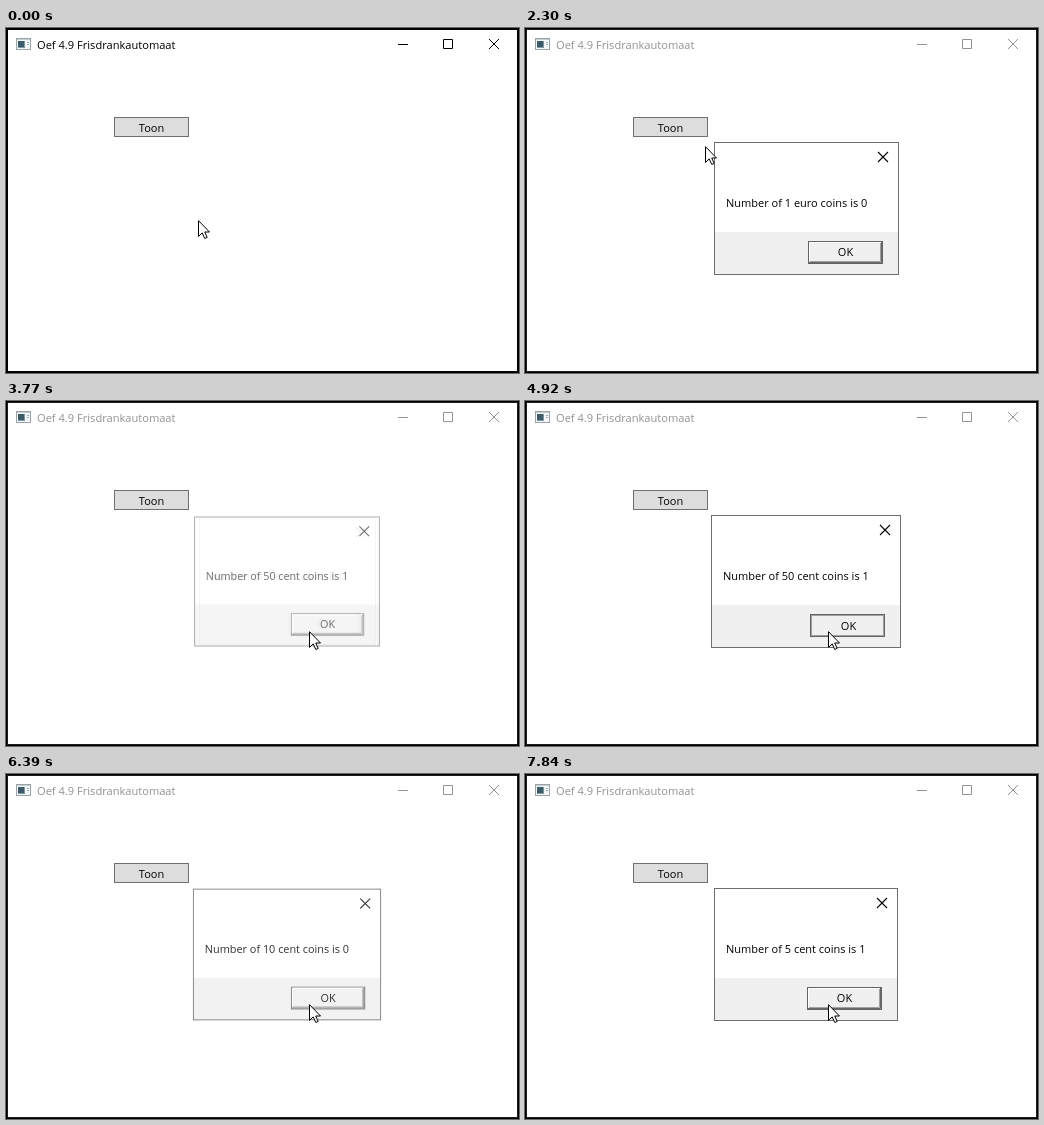
These frames come from a looping animation (513x345 px, 8000 ms). An HTML page:

```html
<!DOCTYPE html>
<html lang="nl">
<head>
<meta charset="utf-8">
<title>Frisdrankautomaat</title>
<style>
  html, body { margin: 0; width: 100%; height: 100%; overflow: hidden; background: #fff; }
  svg { display: block; width: 513px; height: 345px; }
  text { font: 11px "Open Sans", "Noto Sans", sans-serif; }
  .mid { text-anchor: middle; }
</style>
</head>
<body>
<svg id="stage" viewBox="0 0 513 345" fill="none">
  <rect width="513" height="345" fill="#fff"/>
  <rect id="edge" x="1.5" y="1.5" width="510" height="342" stroke="#000"/>
  <rect x=".5" y=".5" width="512" height="344" stroke="#000"/>
  <g id="icon">
    <rect x="10.5" y="10.5" width="14" height="11" fill="#f4f6f7" stroke="#9aa3a8"/>
    <path d="M11 11.5H24" stroke="#c5ced3"/>
    <rect x="12" y="13" width="7" height="7" fill="#3d5a68"/>
    <path d="M12 19.5H19M18.5 13V20" stroke="#7b98a3"/>
    <path d="M21 14.5H23M21 16.5H23" stroke="#8fb0b8"/>
  </g>
  <text id="title" x="31" y="21" style="font-size:11.1px">Oef 4.9 Frisdrankautomaat</text>
  <path id="controls" d="M392 16.5H402M437.5 11.5H446.5V20.5H437.5ZM483 11L493 21M493 11L483 21"/>
  <rect id="toon" x="108.5" y="89.5" width="74" height="19"/>
  <text class="mid" x="145.5" y="104" fill="#000">Toon</text>
  <g id="dialogs"></g>
  <path id="cursor" d="M.5 .7V16.4L4.2 12.9 6.8 18.5 9.2 17.4 6.7 12H11.5Z" fill="#fff" stroke="#000"/>
</svg>
<script>
const LOOP = 8000;
const $ = id => document.getElementById(id);

// Bursts of screen updates: first, last, number of steps
const bursts = [
  [820, 1360, 8], [1590, 2010, 6], [2210, 2970, 11], [3050, 3380, 5],
  [3690, 3930, 4], [4920, 5320, 6], [6080, 6550, 7], [7590, 7840, 4]
];
// Pointer moves: burst index, from, to
const moves = [
  [0, [192, 192], [169, 102]],
  [2, [169, 102], [254, 218]],
  [3, [254, 218], [303, 230]]
];
// Dialogs: message, left, right, opening time, time OK goes down
const boxes = [
  ['1 euro coins is 0', 189, 374, 1758, 3540],
  ['50 cent coins is 1', 186, 376, 3690, 4920],
  ['20 cent coins is 0', 186, 376, 5080, 6080],
  ['10 cent coins is 0', 186, 376, 6260, 7430],
  ['5 cent coins is 1', 189, 373, 7590, Infinity]
];
const TOP = 114, HEIGHT = 133;

const clamp = v => Math.min(1, Math.max(0, v));
const set = (el, attrs) => { for (const k in attrs) el.setAttribute(k, attrs[k]); };

function buildDialog([message, left, right]) {
  const g = document.createElementNS('http://www.w3.org/2000/svg', 'g');
  const b = right - 91, y = 213, w = 75, h = 23, cx = right - 16;
  g.innerHTML = `
    <rect x="${left}" y="${TOP}" width="${right - left}" height="${HEIGHT}" fill="#fff"/>
    <rect x="${left}" y="204" width="${right - left}" height="43" fill="#f0f0f0"/>
    <rect x="${left + .5}" y="${TOP + .5}" width="${right - left - 1}" height="${HEIGHT - 1}" stroke="#6e6e6e"/>
    <path d="M${cx - 5} 124L${cx + 5} 134M${cx + 5} 124L${cx - 5} 134" stroke="#000" stroke-width="1.1"/>
    <text x="${left + 12}" y="179" fill="#000">Number of ${message}</text>
    <rect x="${b + .5}" y="${y + .5}" width="${w - 1}" height="${h - 1}" fill="#f0f0f0" stroke="#646464"/>
    <g class="up">
      <path d="M${b + 1.5} ${y + h - 2}V${y + 1.5}H${b + w - 2}" stroke="#fff"/>
      <path d="M${b + 1} ${y + h - 1.5}H${b + w - 1.5}V${y + 1}" stroke="#696969"/>
      <path d="M${b + 2} ${y + h - 2.5}H${b + w - 2.5}V${y + 2}" stroke="#a0a0a0"/>
    </g>
    <rect class="down" x="${b + 1.5}" y="${y + 1.5}" width="${w - 3}" height="${h - 3}" stroke="#a0a0a0"/>
    <text class="mid ok" x="${b + w / 2}" y="228" fill="#000">OK</text>`;
  $('dialogs').append(g);
  return g;
}
const dialogs = boxes.map(buildDialog);

function snap(t) {
  for (const [a, b, n] of bursts) {
    if (t < a) return t;
    if (t < b) return a + Math.floor((t - a) / (b - a) * (n - 1) + .1) * (b - a) / (n - 1);
  }
  return t;
}

function pointer(t) {
  let pos = moves[0][1];
  for (const [i, from, to] of moves) {
    const [a, b, n] = bursts[i], step = (b - a) / (n - 1);
    if (t < a) break;
    const p = clamp((t - a + step) / (b - a + step));
    const e = (p + p * p * (3 - 2 * p)) / 2;
    pos = from.map((v, j) => Math.round(v + (to[j] - v) * e));
  }
  return pos;
}

function drawDialog(i, t) {
  const [, left, right, open, press] = boxes[i];
  const close = i + 1 < boxes.length ? boxes[i + 1][3] : Infinity;
  const rest = 1 - clamp((t - open) / 240);
  let alpha = t < open ? 0 : 1 - rest * rest;
  let scale = .95 + .05 * alpha;
  if (t >= close) {
    const v = clamp((t - close + 20) / 115);
    alpha = 1 - v;
    scale = 1 - .05 * v;
  }
  const g = dialogs[i], cx = (left + right) / 2, cy = TOP + HEIGHT / 2;
  const down = t >= press && t < close;
  set(g, {
    opacity: alpha,
    display: alpha > 0 ? 'inline' : 'none',
    transform: scale === 1 ? '' : `translate(${cx} ${cy}) scale(${scale}) translate(${-cx} ${-cy})`
  });
  set(g.querySelector('.up'), { display: down ? 'none' : 'inline' });
  set(g.querySelector('.down'), { display: down ? 'inline' : 'none' });
  set(g.querySelector('.ok'), { transform: down ? 'translate(1 1)' : '' });
}

function draw(time) {
  const t = snap(time);
  const active = t < boxes[0][3];
  const [x, y] = pointer(t);
  const hover = active && y < 109;
  const pressed = hover && t >= 1590;

  set($('edge'), { stroke: active ? '#000' : '#1c1c1c' });
  set($('title'), { fill: active ? '#000' : '#929292' });
  set($('controls'), { stroke: active ? '#000' : '#929292' });
  set($('toon'), {
    fill: pressed ? '#c4e5f6' : hover ? '#bee6fd' : '#ddd',
    stroke: pressed ? '#2c628b' : hover ? '#3c7fb1' : '#707070'
  });
  boxes.forEach((_, i) => drawDialog(i, t));
  set($('cursor'), { transform: `translate(${x} ${y})` });
}

const start = performance.now();
function tick() {
  draw((performance.now() - start) % LOOP);
  requestAnimationFrame(tick);
}
tick();
</script>
</body>
</html>
```
